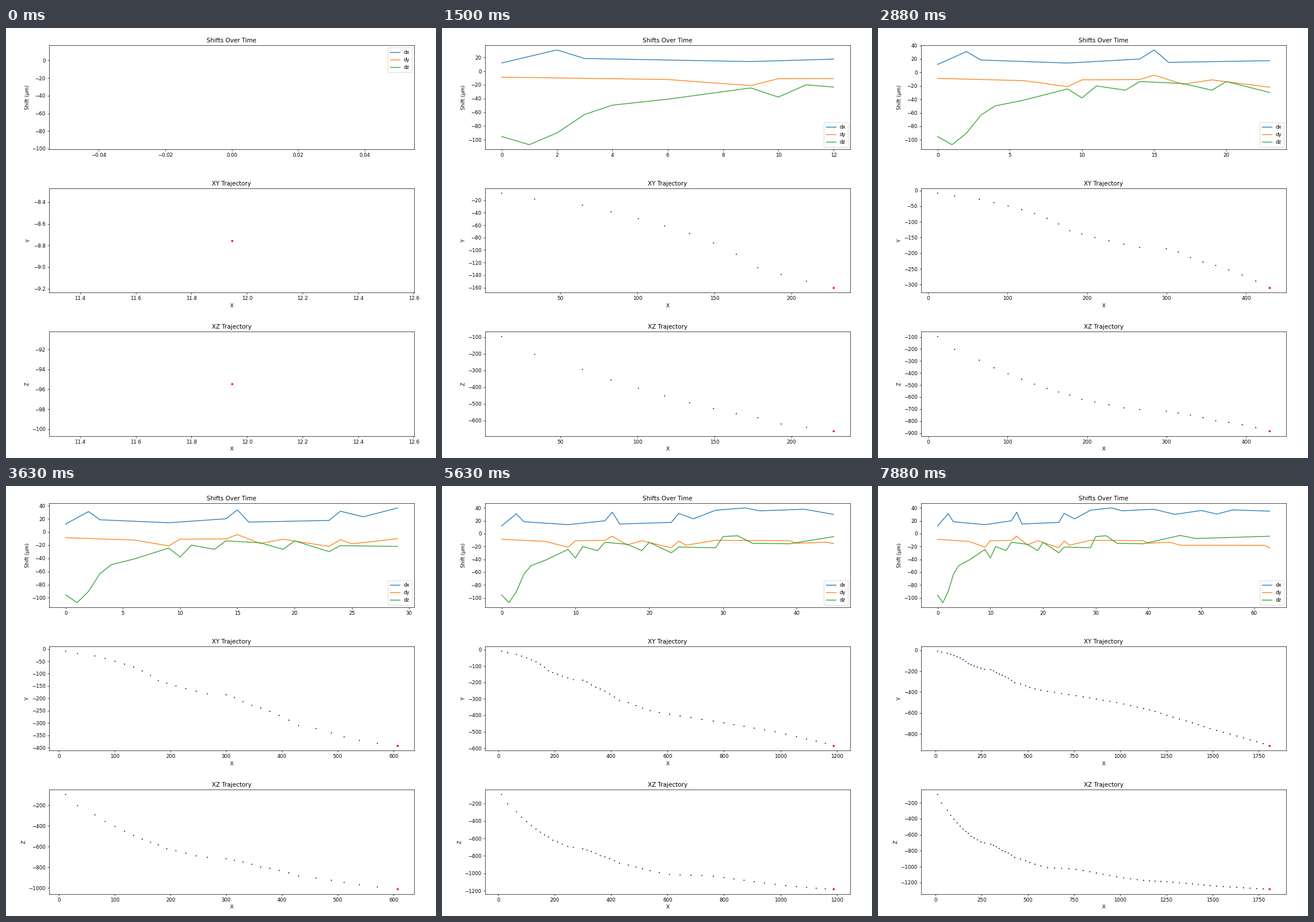
A matplotlib script that plays this animation: 748 px wide and 748 px high, repeating every 8 s.

```python
import numpy as np
import matplotlib.pyplot as plt
from matplotlib.animation import FuncAnimation

SIZE = 748
INCHES = 12
FRAMES = 64
STEP_MS = 125
DOT = "#00004d"

steps = np.arange(FRAMES)


def through(knots):
    """Straight runs between the turning points of a shift."""
    return np.interp(steps, list(knots), list(knots.values()))


# Turning points, step: shift in micrometres
dx = through({0: 11.945, 2: 31, 3: 18.5, 9: 14, 14: 20, 15: 33.5, 16: 15,
              23: 17.5, 24: 31.5, 26: 23, 29: 36.5, 33: 40, 35: 35.5,
              41: 38, 45: 30, 50: 36, 53: 30.5, 56: 37, 63: 35})
dy = through({0: -8.755, 6: -12.2, 9: -21.2, 10: -11, 14: -10.5, 15: -4,
              17: -17.5, 19: -11, 23: -22, 24: -11.7, 25: -18, 29: -10.3,
              39: -11, 40: -15, 44: -13.3, 46: -18, 62: -18.2, 63: -22})
dz = through({0: -95.45, 1: -107.4, 2: -90.3, 3: -63.3, 4: -49.7, 6: -41,
              9: -24.5, 10: -37.9, 11: -20, 13: -26.4, 14: -13.5, 17: -16.5,
              19: -26.4, 20: -13.5, 23: -29.8, 24: -20.8, 29: -22, 30: -4.5,
              32: -3.3, 34: -15, 39: -15.8, 46: -2.8, 49: -7.6, 63: -4})

x, y, z = np.cumsum([dx, dy, dz], axis=1)

fig, (ax_shift, ax_xy, ax_xz) = plt.subplots(
    3, 1, figsize=(INCHES, INCHES), dpi=SIZE / INCHES)
fig.subplots_adjust(left=0.1, right=0.9495, top=0.96, bottom=0.0513,
                    hspace=0.375)


def draw_shifts(n):
    ax_shift.cla()
    for name, shift in (("dx", dx), ("dy", dy), ("dz", dz)):
        ax_shift.plot(steps[:n], shift[:n], label=name)
    ax_shift.set_title("Shifts Over Time")
    ax_shift.set_ylabel("Shift (μm)")
    ax_shift.legend(loc="best")


def draw_path(ax, v, label, n):
    """Small dots for the past positions, a red one for the current."""
    ax.cla()
    past = n - 1
    ax.scatter(x[:n], v[:n], s=[1.3] * past + [10],
               c=[DOT] * past + ["red"])
    ax.set_title(f"X{label} Trajectory")
    ax.set_xlabel("X")
    ax.set_ylabel(label)


def update(i):
    n = i + 1
    draw_shifts(n)
    draw_path(ax_xy, y, "Y", n)
    draw_path(ax_xz, z, "Z", n)


anim = FuncAnimation(fig, update, frames=FRAMES, interval=STEP_MS,
                     repeat=True, repeat_delay=0)
plt.show()
```
